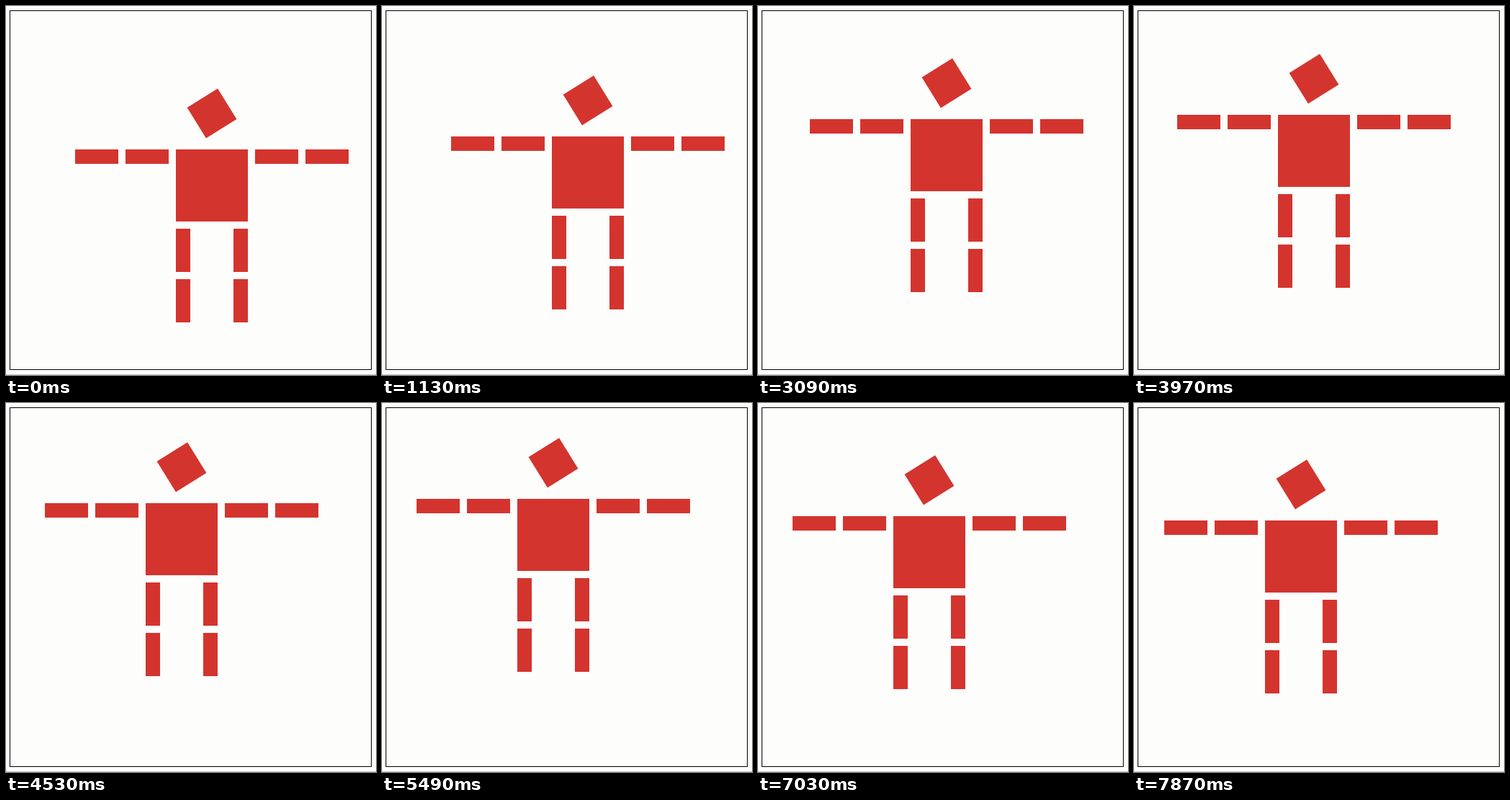
Animation of 514x512 px, one loop 8 s. Source, as an HTML page:

```html
<!DOCTYPE html>
<html>
<head>
<meta charset="utf-8">
<style>
  html, body { margin: 0; width: 100%; height: 100%; overflow: hidden; background: #fdfdfc; }
  svg { display: block; }
</style>
</head>
<body>
<svg width="514" height="512" viewBox="0 0 514 512">
  <defs>
    <rect id="arm" width="60" height="20"/>
    <rect id="leg" width="20" height="60"/>
  </defs>
  <path d="M0 511.5H514" stroke="#c4c4c4"/>
  <rect x="5.5" y="6.5" width="502" height="498" fill="none" stroke="#000"/>
  <g id="figure" fill="#d4342e">
    <rect x="25" y="-75" width="50" height="50" transform="rotate(-31.8 50 -50)"/>
    <rect width="100" height="100"/>
    <use href="#arm" x="-140"/><use href="#arm" x="-70"/>
    <use href="#arm" x="110"/><use href="#arm" x="180"/>
    <use href="#leg" y="110"/><use href="#leg" y="180"/>
    <use href="#leg" x="80" y="110"/><use href="#leg" x="80" y="180"/>
  </g>
</svg>
<script>
const LOOP = 8000, STEP = 6;
const figure = document.getElementById('figure');

// Steps taken so far by a key that repeats `count` times, every `gap` ms
function steps(t, start, count = 1, gap = 1) {
  const n = Math.floor((t - start) / gap) + 1;
  return Math.max(0, Math.min(count, n));
}

function draw(t) {
  const left = steps(t, 1470) + steps(t, 2170, 5, 420) + steps(t, 4510, 2, 330) + steps(t, 7750);
  const up = steps(t, 720, 4, 170) + steps(t, 2170, 3, 420) + steps(t, 3850, 4, 330);
  const down = steps(t, 5530) + steps(t, 6310, 3, 250) + steps(t, 7310);
  const x = 236 - STEP * left, y = 199 + STEP * (down - up);
  figure.setAttribute('transform', `translate(${x} ${y})`);
}

const begin = performance.now();
function tick() {
  draw((performance.now() - begin) % LOOP);
  requestAnimationFrame(tick);
}
tick();
</script>
</body>
</html>
```
